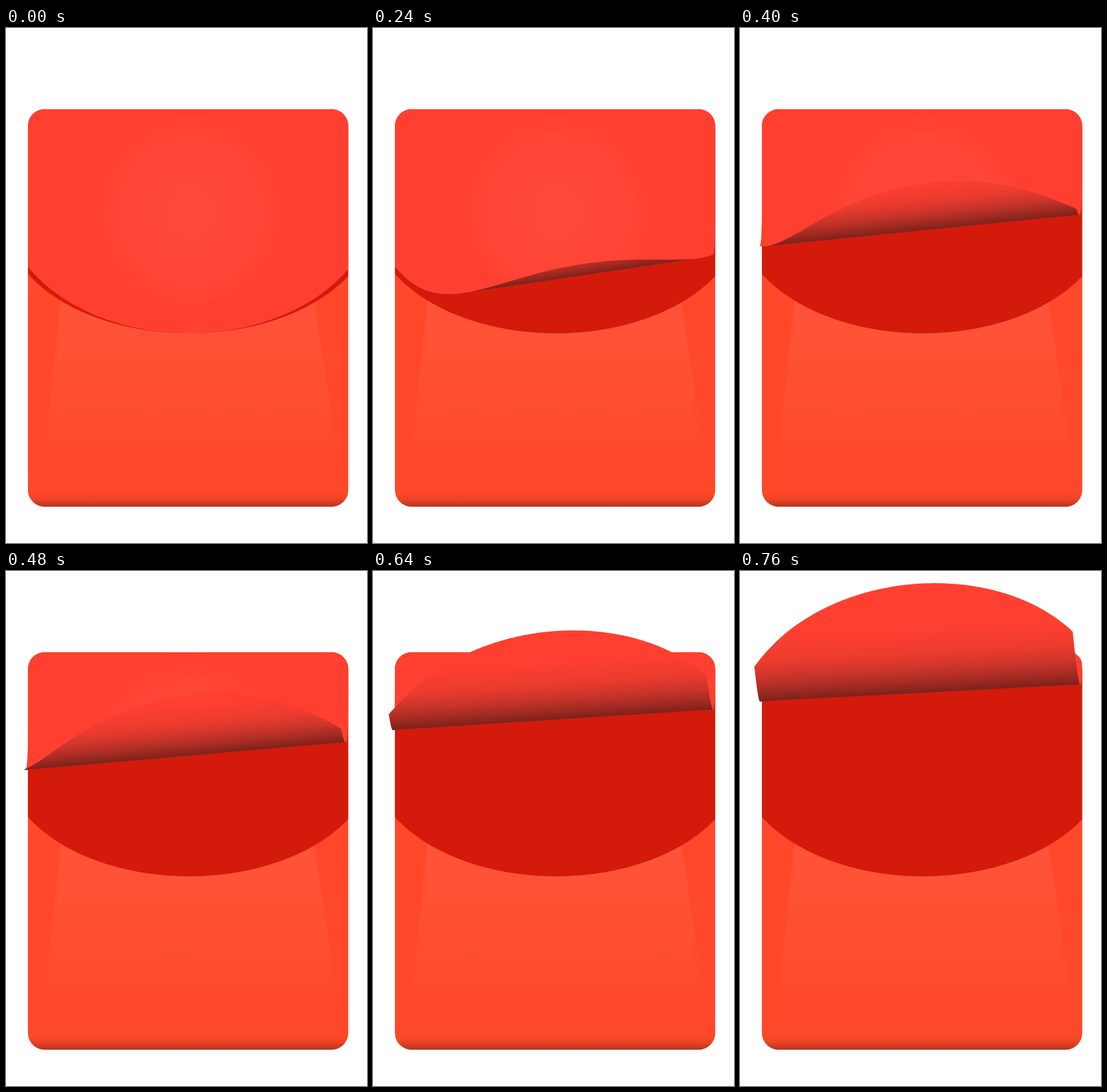
An HTML page that plays this animation: 626x894 px, repeating every 2.42 s.

```html
<!DOCTYPE html>
<html lang="en">
<head>
<meta charset="utf-8">
<title>Opening envelope</title>
<style>
  html, body { margin: 0; width: 100%; height: 100%; overflow: hidden; background: #fff; }
  svg { display: block; width: 100%; height: 100%; }
</style>
</head>
<body>
<svg viewBox="0 0 626 894">
  <defs>
    <clipPath id="card"><rect x="38" y="141" width="555.5" height="690" rx="29"/></clipPath>
    <linearGradient id="panel" x1="0" y1="477" x2="0" y2="740" gradientUnits="userSpaceOnUse">
      <stop offset="0" stop-color="#ff5339"/>
      <stop offset=".5" stop-color="#ff4f32"/>
      <stop offset="1" stop-color="#ff4929"/>
    </linearGradient>
    <linearGradient id="base" x1="0" y1="806" x2="0" y2="831" gradientUnits="userSpaceOnUse">
      <stop offset="0" stop-color="#9c2f18" stop-opacity="0"/>
      <stop offset=".5" stop-color="#9c2f18" stop-opacity=".2"/>
      <stop offset="1" stop-color="#9c2f18" stop-opacity=".75"/>
    </linearGradient>
    <radialGradient id="glow" cx="320" cy="320" r="180" gradientUnits="userSpaceOnUse">
      <stop offset="0" stop-color="#ff4939"/>
      <stop offset=".7" stop-color="#ff4535"/>
      <stop offset="1" stop-color="#ff3f30"/>
    </radialGradient>
    <linearGradient id="roll" gradientUnits="userSpaceOnUse">
      <stop offset="0" stop-color="#7c211b"/>
      <stop offset=".15" stop-color="#a02a22"/>
      <stop offset=".35" stop-color="#c8342a"/>
      <stop offset=".6" stop-color="#eb3b2e"/>
      <stop offset="1" stop-color="#ff4031"/>
    </linearGradient>
  </defs>
  <g clip-path="url(#card)">
    <rect x="38" y="141" width="556" height="690" fill="#ff4829"/>
    <path d="M96 460H533L574 740H66Z" fill="url(#panel)"/>
    <rect x="38" y="806" width="556" height="25" fill="url(#base)"/>
    <path id="inside" fill="#d41a0b"/>
  </g>
  <path id="front" fill="url(#glow)"/>
  <path id="back" fill="url(#roll)"/>
</svg>
<script>
const LOOP = 2420, STEP = 40, LAST = 19;
const LEFT = 38, RIGHT = 593.5, TOP = 141, CORNER = 29;
const PIVOT = 315;

// Fold height at the pivot and fold slope, every four steps
const FOLD_Y = [560, 424, 307, 228.7, 154, 80];
const FOLD_SLOPE = [.28, .185, .119, .0868, .0645, .0495];

const el = id => document.getElementById(id);
const range = (n, fn) => Array.from({ length: n + 1 }, (_, i) => fn(i / n));
const mix = (a, b, u) => a + (b - a) * u;
const toPath = pts =>
  pts.length ? 'M' + pts.map(p => p.map(v => v.toFixed(2)).join(' ')).join('L') + 'Z' : '';

// Lower edge of the flap or pocket, an ellipse hanging down to y = 530
const rim = (x, ry) => 530 - ry * (1 - Math.sqrt(1 - ((x - 317.5) / 322) ** 2));

function sheet(ry) {
  const corner = (cx, from) => range(10, u => {
    const a = from + u * Math.PI / 2;
    return [cx + CORNER * Math.cos(a), TOP + CORNER + CORNER * Math.sin(a)];
  });
  const side = (x, y0, y1) => range(80, u => [x, mix(y0, y1, u)]);
  const shoulder = TOP + CORNER;
  return [
    ...corner(LEFT + CORNER, Math.PI),
    ...range(40, u => [mix(LEFT + CORNER, RIGHT - CORNER, u), TOP]),
    ...corner(RIGHT - CORNER, -Math.PI / 2),
    ...side(RIGHT, shoulder, rim(RIGHT, ry)),
    ...range(140, u => mix(RIGHT, LEFT, u)).map(x => [x, rim(x, ry)]),
    ...side(LEFT, rim(LEFT, ry), shoulder)
  ];
}

const flap = sheet(230);
el('inside').setAttribute('d', toPath(sheet(204.6)));

function spline(keys, pos) {
  const i = Math.min(Math.floor(pos), keys.length - 2), u = pos - i;
  const b = keys[i], c = keys[i + 1];
  const a = keys[i - 1] ?? 2 * b - c, d = keys[i + 2] ?? 2 * c - b;
  return b + u / 2 * (c - a + u * (2 * a - 5 * b + 4 * c - d + u * (3 * (b - c) + d - a)));
}

// Part of a polygon where depth(point) <= 0
function clip(pts, depth) {
  const out = [];
  pts.forEach((p, i) => {
    const q = pts[(i + 1) % pts.length], dp = depth(p), dq = depth(q);
    if (dp <= 0) out.push(p);
    if ((dp <= 0) !== (dq <= 0)) {
      const u = dp / (dp - dq);
      out.push([mix(p[0], q[0], u), mix(p[1], q[1], u)]);
    }
  });
  return out;
}

function draw(time) {
  const k = Math.min(LAST, Math.floor(time / STEP));
  const foldY = spline(FOLD_Y, k / 4);
  const angle = Math.atan(spline(FOLD_SLOPE, k / 4));
  const radius = 56 + 3 * k;
  const nx = Math.sin(angle), ny = Math.cos(angle);
  const distance = ([x, y]) => (x - PIVOT) * nx + (y - foldY) * ny;
  const crest = radius * Math.PI / 2;

  // Wrap the sheet around a cylinder lying along the fold
  const curl = p => {
    const s = distance(p);
    if (s <= 0) return p;
    const to = s < 2 * crest ? radius * Math.sin(s / radius) : 2 * crest - s;
    return [p[0] + (to - s) * nx, p[1] + (to - s) * ny];
  };

  el('front').setAttribute('d', toPath(clip(flap, p => distance(p) - crest).map(curl)));
  el('back').setAttribute('d', toPath(clip(flap, p => crest - distance(p)).map(curl)));

  const ends = { x1: PIVOT + nx * radius, y1: foldY + ny * radius, x2: PIVOT, y2: foldY };
  for (const name in ends) el('roll').setAttribute(name, ends[name]);
}

const start = performance.now();
function tick() {
  draw((performance.now() - start) % LOOP);
  requestAnimationFrame(tick);
}
tick();
</script>
</body>
</html>
```
